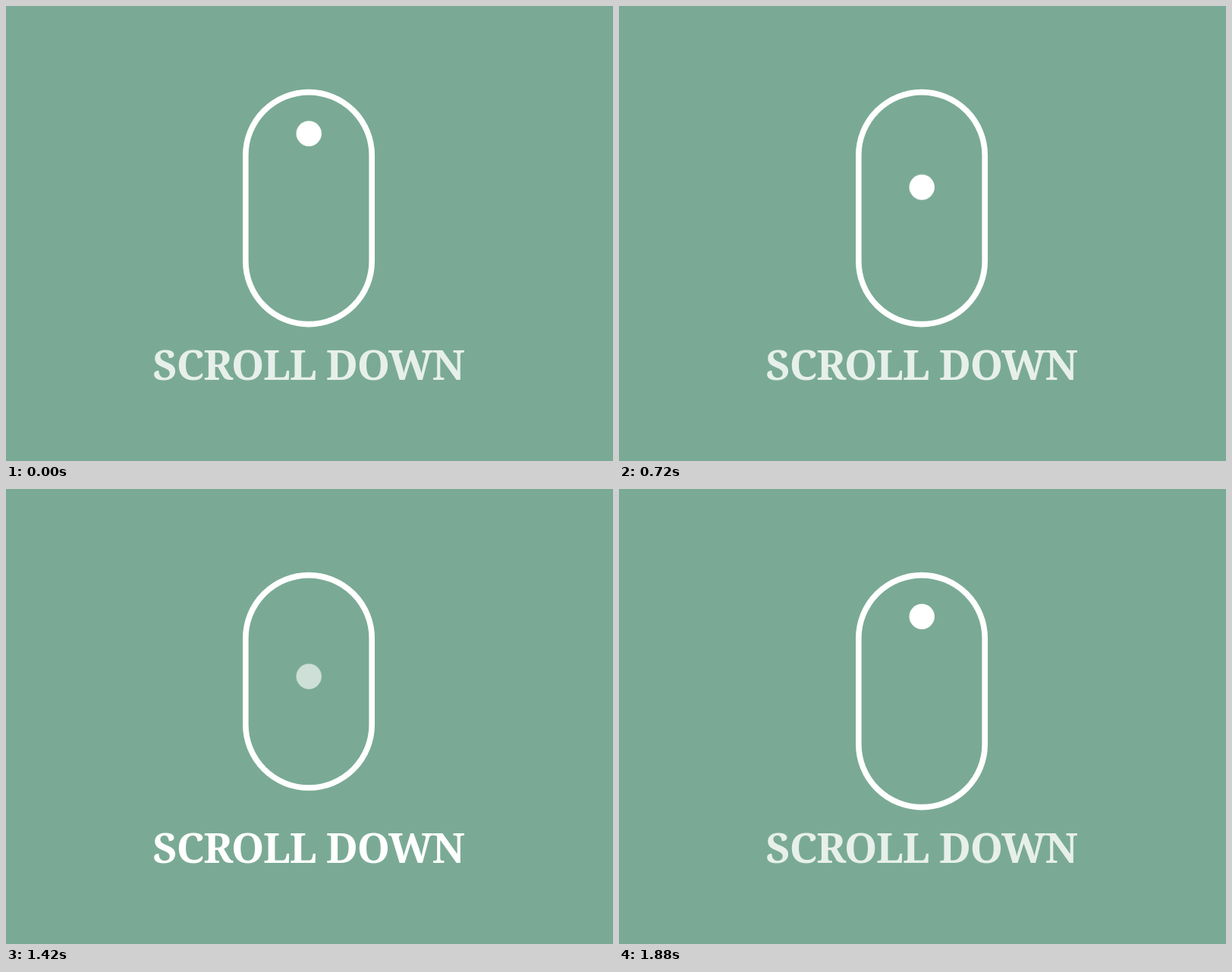
Recreate the animation shown at these times as an HTML page. Size 800 by 600 pixels, loop 1900 ms.

```html
<!DOCTYPE html>
<html lang="en">
<head>
<meta charset="utf-8">
<title>Scroll down</title>
<style>
  html, body { margin: 0; width: 100%; height: 100%; overflow: hidden; background: #7aaa95; }
  svg { display: block; width: 800px; height: 600px; }

  .mouse, .dot, .label { animation: 1900ms linear -20ms infinite; }

  .mouse {
    fill: none; stroke: #fff; stroke-width: 7.6px;
    height: 306px;
    animation-name: squash;
  }
  .dot { fill: #fff; animation-name: travel, fade; }
  .label {
    fill: #fff;
    font: 700 55px "Noto Serif", serif;
    letter-spacing: -1.15px;
    text-anchor: middle;
    animation-name: glow;
  }

  @keyframes squash {
    0%, 53% { height: 306px; }
    63.158% { height: 267px; }
    100% { height: 306px; }
  }

  /* quadratic fall, quadratic return */
  @keyframes travel {
    0% { transform: translateY(0); animation-timing-function: cubic-bezier(.3333, 0, .6667, .3333); }
    63.158% { transform: translateY(185.5px); animation-timing-function: cubic-bezier(.3333, .6667, .6667, 1); }
    99.63%, 100% { transform: translateY(0); }
  }

  @keyframes fade {
    0%, 53% { opacity: 1; }
    63.158% { opacity: .2; }
    87%, 100% { opacity: 1; }
  }

  @keyframes glow {
    0%, 63.158% { opacity: .82; }
    75%, 86% { opacity: 1; }
    100% { opacity: .82; }
  }
</style>
</head>
<body>
<svg viewBox="0 0 800 600">
  <rect class="mouse" x="315.8" y="113.6" width="166.4" rx="83.2" ry="83.2"/>
  <circle class="dot" cx="399.2" cy="168.2" r="16.7"/>
  <text class="label" x="398.6" y="492.5">SCROLL DOWN</text>
</svg>
</body>
</html>
```
